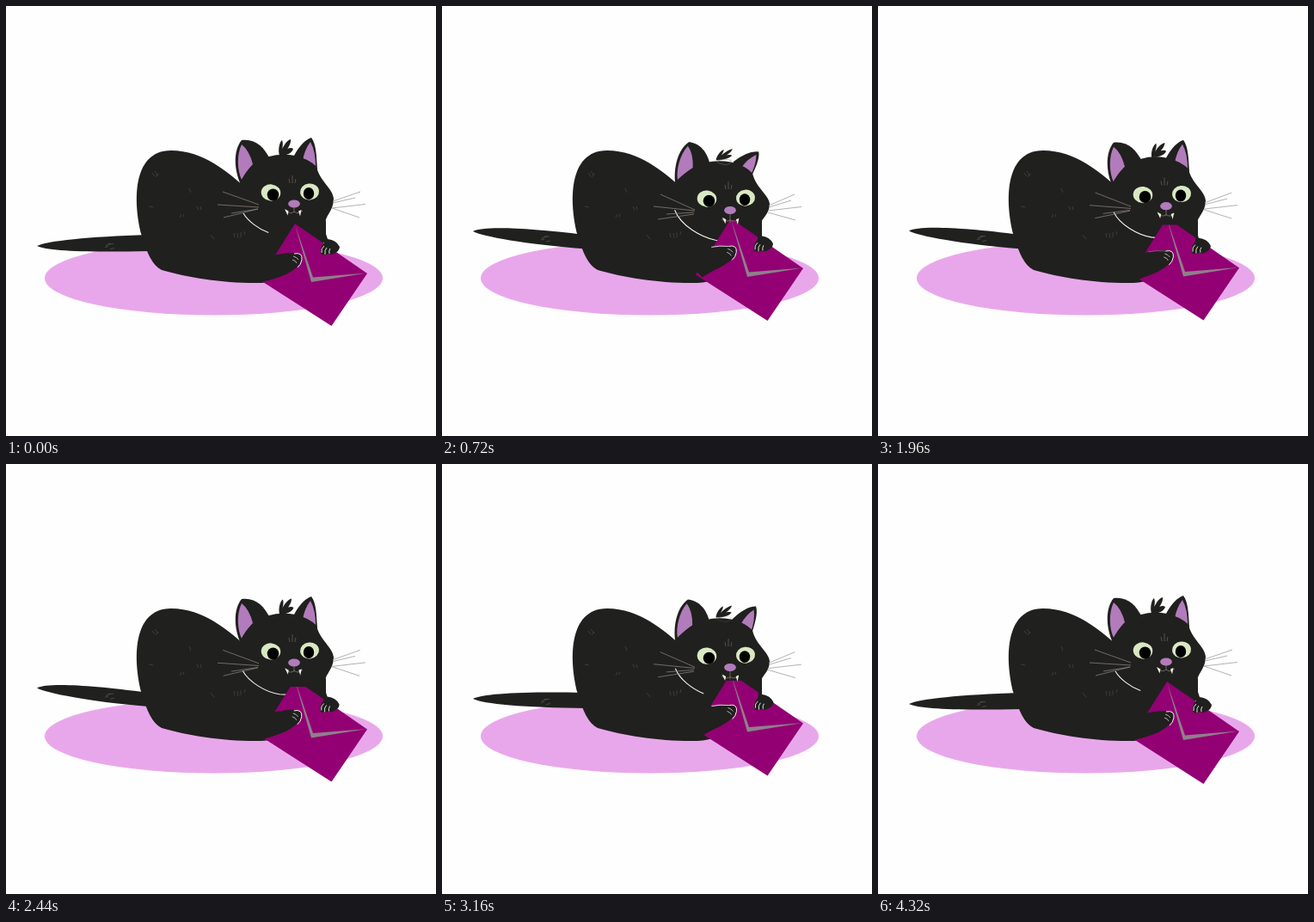
Write an HTML page with a canvas that moves like this. It is 500 px wide and 500 px high and loops after 4.4 s.

```html
<!DOCTYPE html>
<html>
<head>
<meta charset="utf-8">
<style>
html, body { margin: 0; width: 100%; height: 100%; overflow: hidden; background: #fefefe; }
canvas { display: block; width: 500px; height: 500px; }
</style>
</head>
<body>
<canvas id="stage" width="500" height="500"></canvas>
<script>
const ctx = document.getElementById('stage').getContext('2d');
const LOOP = 4400, FRAME = 40, END = 4320;
const BLACK = '#20201e', PURPLE = '#b27bbb', MAGENTA = '#930073', GREY = '#8f7f8c';

// Each track is a list of [time, value] pairs.
const tracks = {
  head: [[0, 0], [720, 7.5], [1400, 8], [1680, 5.5], [2240, 1], [2440, 1], [2640, 0], [2800, 1.3], [3160, 6.5], [3840, 4], [END, 0]],
  letter: [[0, 0], [560, -4], [720, -6], [1120, -8.7], [1400, -9.5], [1680, -8.7], [2240, -4], [2440, -2.6], [2640, 0], [2800, -1.2], [3160, -9.5], [3840, -6.4], [END, 0]],
  tail: [[0, 279], [720, 262], [1400, 262.5], [2440, 260.5], [3160, 273], [3840, 279], [END, 279]],
  earL: [[0, 0], [720, 1], [1400, 0], [2440, 0], [3160, 0.9], [3840, 0.6], [END, 0]],
  earR: [[0, 0], [720, 1], [1400, 0], [2440, 0], [3160, 0.72], [3840, 0.5], [END, 0]],
  lip: [[0, 253], [720, 249], [1400, 249], [2440, 259], [3160, 252], [3840, 251], [END, 253]],
  chin: [[0, 0.5], [720, 1], [1400, 0.65], [2440, 1], [3160, 0.6], [3840, 0.58], [END, 0.5]]
};

// Monotone cubic interpolation: smooth, with no overshoot at the turns.
function sample(keys, t) {
  let i = 0;
  while (i < keys.length - 2 && t > keys[i + 1][0]) i++;
  const rise = j => keys[j] && keys[j + 1]
    ? (keys[j + 1][1] - keys[j][1]) / (keys[j + 1][0] - keys[j][0]) : 0;
  const slope = j => {
    const a = rise(j - 1), b = rise(j);
    return a * b <= 0 ? 0 : 2 * a * b / (a + b);
  };
  const [t0, v0] = keys[i], [t1, v1] = keys[i + 1];
  const d = t1 - t0, u = Math.min(1, (t - t0) / d), w = 1 - u;
  return v0 * (1 + 2 * u) * w * w + v1 * u * u * (3 - 2 * u)
    + d * u * w * (slope(i) * w - slope(i + 1) * u);
}

const fill = (color, d) => {
  ctx.fillStyle = color;
  ctx.fill(new Path2D(d));
};
const stroke = (color, width, d) => {
  ctx.strokeStyle = color;
  ctx.lineWidth = width;
  ctx.stroke(new Path2D(d));
};
const oval = (color, x, y, rx, ry = rx, turn = 0) => {
  ctx.fillStyle = color;
  ctx.beginPath();
  ctx.ellipse(x, y, rx, ry, turn, 0, 7);
  ctx.fill();
};
const group = (x, y, draw) => {
  ctx.save();
  ctx.translate(x, y);
  draw();
  ctx.restore();
};
const turnAt = (x, y, degrees, scale = 1) => {
  ctx.translate(x, y);
  ctx.rotate(degrees * Math.PI / 180);
  ctx.scale(scale, scale);
  ctx.translate(-x, -y);
};

function drawTail(y) {
  const k = y - 262;
  fill(BLACK, `M36 ${y}C48 ${y - 6} 95 ${257.5 + k * 0.64} 165 266L168 ${282.5 + k * 0.14}
    C95 ${277 + k * 0.57} 48 ${y + 6} 36 ${y}Z`);
  group(0, k * 0.5, () => stroke('#55554f', 0.8,
    'M116 270l6-2M119 268l6 0M115 272l4-1M121 274l5-1'));
}

function drawBody() {
  fill(BLACK, `M157.5 266C148.5 232 145 168 192 168C230 168 258 194 275 208L340 200L372 250
    L372 274L340 290L318 318Q310 321 297 322C257 323 212 316 181 307C170 301 164 288 157.5 266Z`);
  stroke('#464642', 0.8, `M170 194l3 4M173 192l4 5M177 195l-3 4M213 212l2 5M222 233l2 4
    M226 233l1 4M166 233l5 1M202 246l2-4M206 245l1-3M238 266l4 5M265 264l1 5M269 264l1 6
    M273 263l0 6M278 262l-1 4`);
}

function drawEars(p) {
  group(1.5 * p.earL, p.head - 4 * p.earL, () => {
    turnAt(285, 195, 17 * p.earL);
    fill(BLACK, 'M273 208C265 190 264 168 274 156C290 154 300 164 307 178L300 205Z');
    fill(PURPLE, 'M274 161C268 173 269 192 274 202Q281 190 287 184Q283 168 274 161Z');
  });
  group(0, p.head + 2 * p.earR, () => {
    turnAt(354, 185, 28 * p.earR, 1 - 0.1 * p.earR);
    fill(BLACK, 'M332 180Q342 158 355 153C361 161 361 175 362 190L340 195Z');
    fill(PURPLE, 'M354 158Q347 167 345 180Q354 181 360 186Q360 169 354 158Z');
  });
}

function drawTuft(h) {
  const k = h / 8;
  group(319 + k, 173 + 6 * k, () => {
    ctx.transform(1, 0, -0.35 * k, 1 - 0.33 * k, 0, 0);
    fill(BLACK, `M-1 1C-3-6-1-15 2-17C4-13 2-4 0 1Z
      M0 1C1-7 7-17 12-18C13-12 7-4 0 1Z M0 1C4-6 11-10 15-7C14-2 7 1 0 1Z`);
  });
  if (k > 0.7) {
    ctx.globalAlpha = (k - 0.7) / 0.3;
    stroke('#77776f', 0.6, `M319 ${173 + h}q8-4 17-1q1 5-7 5q-8-1-10-4`);
    ctx.globalAlpha = 1;
  }
}

function drawHead(p) {
  const h = p.head;
  drawEars(p);
  fill(BLACK, `M272 ${206 + h / 2}Q284 ${180 + h} 306 ${175 + h}Q320 ${171 + h} 336 ${174 + h}
    Q353 ${178 + h} 361 ${187 + h}C365 ${204 + h} 380 ${212 + h} 381 ${224 + h * 0.8}
    C381 ${238 + h * 0.6} 371 ${244 + h * 0.4} 371 253L372 270L310 268Q276 255 272 206Z`);
  drawTuft(h);

  // Jaw outline
  const x = 276 - 5 * h / 7, y = 241 - h / 2;
  ctx.setLineDash([75 * p.chin, 200]);
  stroke('#f4f4ef', 1.1, `M${x} ${y}C${283 - h * 0.7} ${253 + h * 0.4} 302 ${265 + h * 0.5} 318 ${267 + h * 0.7}Q328 ${268 + h * 0.8} 338 ${266 + h}`);
  ctx.setLineDash([]);

  group(0, h * 0.95, () => {
    stroke('#5c5851', 0.9, 'M329 201l1 5M333 197l0 9M337 201l-1 5');
    oval('#d9e8c2', 308, 217, 11.3, 9.6, 0.1);
    oval('#000', 310.5, 219.5, 6.8, 7);
    oval('#d9e8c2', 353, 216, 11, 9.5, -0.1);
    oval('#000', 352, 218, 6.2, 7);
  });
}

function drawLetter(p) {
  ctx.save();
  ctx.beginPath();
  ctx.rect(0, p.lip, 500, 500);
  ctx.clip();
  ctx.translate(0, p.letter);
  fill(MAGENTA, 'M336 253L420 311L378.5 372L295 318.5Z');
  fill(GREY, 'M336 254L357 315.5L419.5 310.5L355 321Z');
  ctx.restore();
}

function drawMuzzle(h) {
  group(0, h, () => {
    stroke('#77706b', 0.9, `M335 234v${6 + h * 0.6}M325 ${238 + h * 0.3}Q331 ${243 + h * 0.2} 335 ${239 + h * 0.3}Q340 ${243 + h * 0.2} 345 ${238 + h * 0.3}`);
    oval(PURPLE, 335, 230, 6.9, 4.6);
  });
  group(h * 0.25, h * 1.3, () => fill('#f5eee1',
    'M324 236L328.5 238.5L327.5 243.5ZM340 238.5L343.5 237L342 244.5Z'));
}

function drawWhiskers(h) {
  const k = h / 7.5;
  stroke('#8d857d', 0.75, `M${252 + 2 * k} ${216 + 3 * k}L294 ${231 + 6 * k}
    M246 ${231 + 2 * k}L294 ${234 + 4 * k}
    M${262 - k} ${241 + k}L293 ${236 + 4 * k}
    M${253 - 2 * k} ${246 + 2 * k}L293 ${236 + 6 * k}`);
  stroke('#a5a5a5', 0.85, `M380 ${227 + 5 * k}L${412 - 2 * k} ${216 + 3 * k}
    M380 ${229 + 5 * k}L406 ${223 + 3 * k}
    M379 ${235 + 3 * k}L418 ${230.5 + 3 * k}
    M379 ${235 + 5 * k}L411 ${246 + 3 * k}`);
}

function drawPaws(h) {
  const u = -1.15 * h;
  group(u * 0.2, u, () => {
    fill(BLACK, `M280 ${294 - u / 2}L300 292Q318 288 331 287Q345 286 344 295
      Q341 304 326 312Q315 317 ${297 - u * 0.85} ${321 - u * 0.35}Z`);
    stroke('#f4f4ef', 1, 'M335 288Q345 286 344 295Q343 301 339 304');
    stroke('#d8d8d2', 0.8, 'M334 291q4 1 6 4M333 295q4 1 5 4');
    ctx.globalAlpha = Math.max(0, Math.min(1, (h - 2) / 2));
    stroke('#f4f4ef', 0.9, 'M315 289Q324 287 335 288');
  });

  group(-0.4 * h, -0.5 * h, () => {
    fill(BLACK, `M371 262L374 271Q384 272 388 280Q388 285 381 288Q378 290 375 288
      Q370 291 366 288Q364 283 370 275Z`);
    stroke('#f4f4ef', 0.9, 'M370 279q-4 3-3 8M373 281q-3 3-2 8M377 282q-2 3-1 6');
  });
}

function draw(now) {
  const t = Math.min(END, Math.floor(now % LOOP / FRAME) * FRAME);
  const p = {};
  for (const name in tracks) p[name] = sample(tracks[name], t);

  ctx.fillStyle = '#fefefe';
  ctx.fillRect(0, 0, 500, 500);
  oval('#e9a7eb', 241.5, 316.5, 196.5, 43);
  drawTail(p.tail);
  drawBody();
  drawHead(p);
  drawLetter(p);
  drawMuzzle(p.head);
  drawWhiskers(p.head);
  drawPaws(p.head);
}

const start = performance.now();
function tick() {
  draw(performance.now() - start);
  requestAnimationFrame(tick);
}
tick();
</script>
</body>
</html>
```
